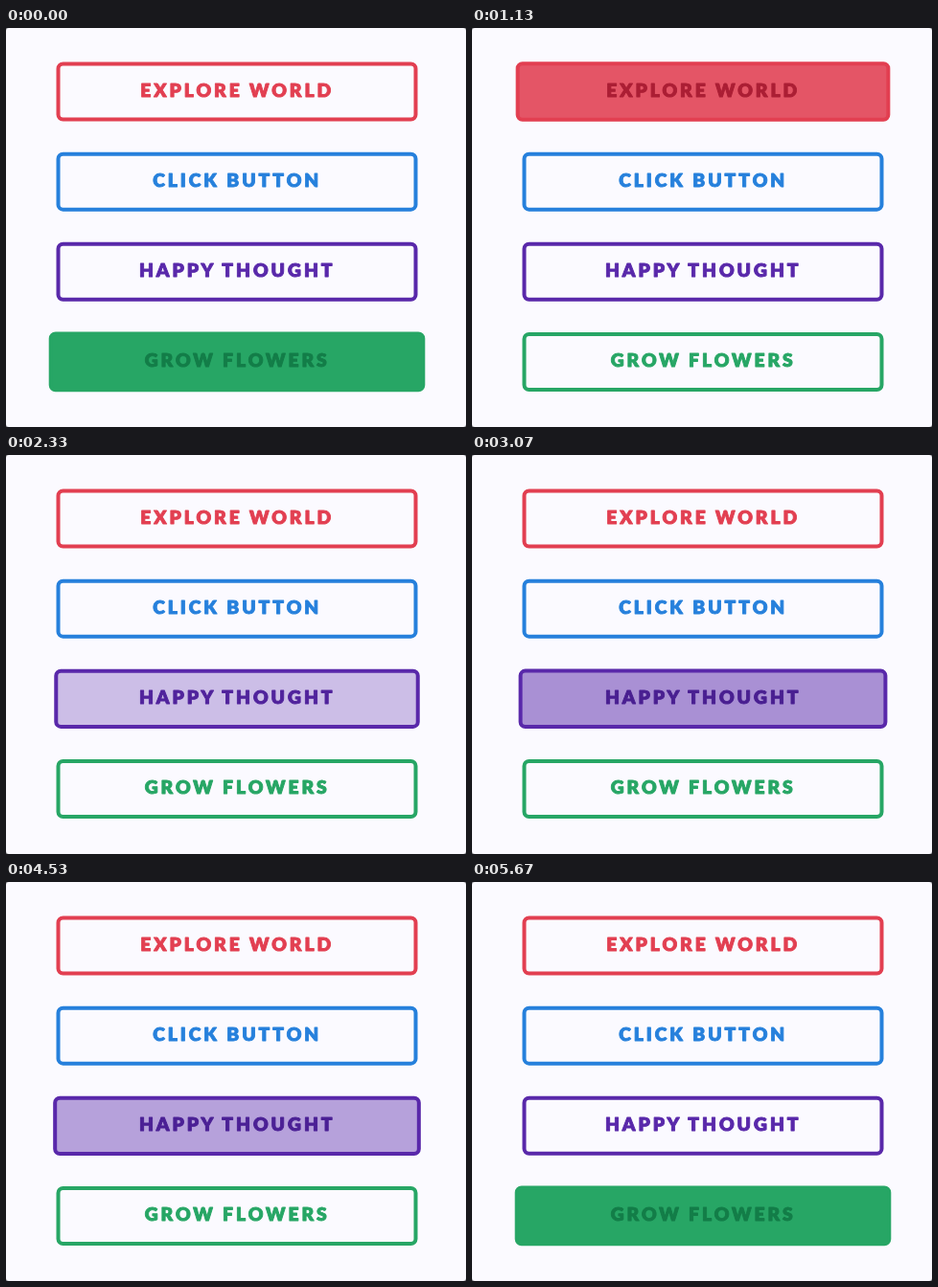
Animation of 480x417 px, one loop 5.74 s. Source, as an HTML page:

```html
<!DOCTYPE html>
<html lang="en">
<head>
<meta charset="utf-8">
<title>Hover buttons</title>
<style>
  html, body { margin: 0; width: 100%; height: 100%; overflow: hidden; background: #6b6b70; }
  svg { display: block; width: 480px; height: 417px; }
  .stage { fill: #fbfaff; }

  /* --row: place in the column; --p: hover level, 0 at rest and 1 when filled */
  .button {
    --p: 0;
    --ink: color-mix(in srgb, var(--dark) calc(var(--p) * 100%), var(--color));
    transform: translateY(calc(66.5px + 94.15px * var(--row)));
  }
  .button rect {
    x: calc(54.5px - 7.8px * var(--p));
    width: calc(373px + 15.6px * var(--p));
    y: calc(-29px - 0.4px * var(--p));
    height: calc(58px + 0.8px * var(--p));
    rx: 5px;
    fill: var(--color);
    fill-opacity: var(--p);
    stroke: var(--color);
    stroke-width: 4px;
  }
  .button text {
    font: 900 19.3px Lato, "Open Sans", sans-serif;
    letter-spacing: 2.95px;
    text-anchor: middle;
    fill: var(--ink);
    stroke: var(--ink);
    stroke-width: 0.9px;
    stroke-linejoin: round;
  }

  .red    { --row: 0; --color: #e23f51; --dark: #a31a30; }
  .blue   { --row: 1; --color: #2680dc; --dark: #0b439c; }
  .purple { --row: 2; --color: #5928aa; --dark: #391678; }
  .green  { --row: 3; --color: #27a665; --dark: #137d48; }
</style>
</head>
<body>
<svg viewBox="0 0 480 417">
  <rect class="stage" width="480" height="417" rx="3"/>
  <g class="button red"><rect/><text x="241.2" y="5.5">EXPLORE WORLD</text></g>
  <g class="button blue"><rect/><text x="241.2" y="5.5">CLICK BUTTON</text></g>
  <g class="button purple"><rect/><text x="241.2" y="5.5">HAPPY THOUGHT</text></g>
  <g class="button green"><rect/><text x="241.2" y="5.5">GROW FLOWERS</text></g>
</svg>
<script>
  const LOOP = 5740;
  const SECOND_SWEEP = 2824;
  const FADE = 150;

  // One sweep of the pointer, up the column and back down
  const visits = [
    { row: 3, enter: -FADE },
    { row: 2, enter: 172 },
    { row: 1, enter: 430 },
    { row: 0, enter: 1015 },
    { row: 1, enter: 1330 },
    { row: 2, enter: 1639 },
    { row: 3, enter: 2385 },
  ];
  const buttons = [...document.querySelectorAll(".button")];

  const fade = ms => {
    const x = Math.min(Math.max(ms / FADE, 0), 1);
    return (1 - Math.cos(Math.PI * x)) / 2;
  };

  function draw(now) {
    const time = now % LOOP;
    const t = time < SECOND_SWEEP ? time : time - SECOND_SWEEP;
    const levels = buttons.map(() => 0);

    // Each button is left in time to fade out before the next is entered
    visits.forEach(({ row, enter }, i) => {
      const leave = (visits[i + 1]?.enter ?? LOOP) - FADE;
      levels[row] += fade(t - enter) - fade(t - leave);
    });
    buttons.forEach((button, row) => button.style.setProperty("--p", levels[row].toFixed(4)));
  }

  const start = performance.now();
  function tick() {
    draw(performance.now() - start);
    requestAnimationFrame(tick);
  }
  tick();
</script>
</body>
</html>
```
